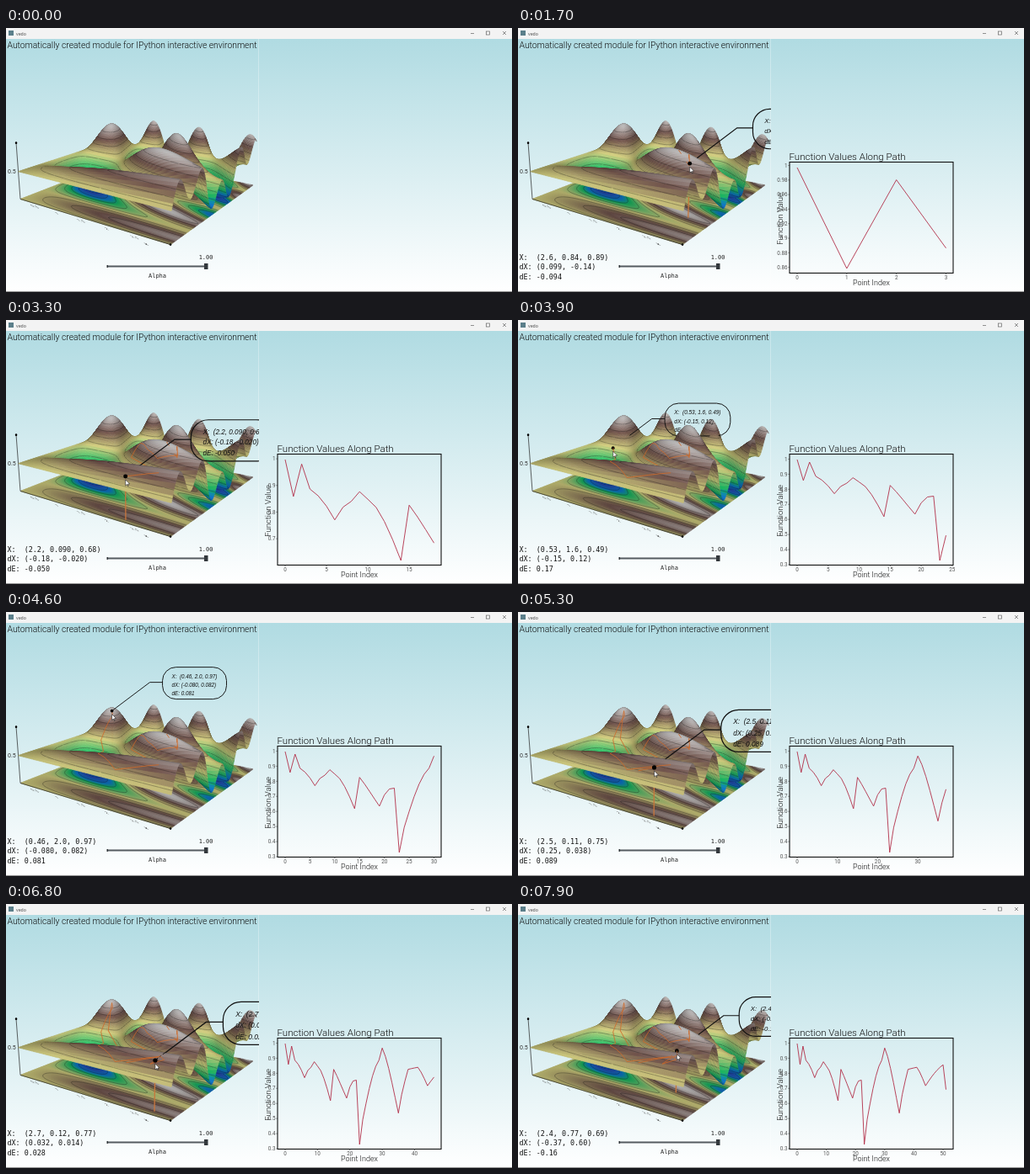
Animation, 600 px wide and 314 px high, one loop 8000 ms. Source, as an HTML page with a canvas:

```html
<!DOCTYPE html>
<html lang="en">
<head>
<meta charset="utf-8">
<title>vedo</title>
<style>
html, body { margin: 0; width: 100%; height: 100%; overflow: hidden; background: #fff }
canvas { display: block }
</style>
</head>
<body>
<canvas id="stage" width="600" height="314"></canvas>
<script>
const LOOP = 8000, STEP = 100, FIRST = 14, BANDS = 28, CELLS = 100;
const SANS = 'Roboto, sans-serif', MONO = '"DejaVu Sans Mono", monospace';
const stage = document.getElementById('stage').getContext('2d');
const mix = (a, b, r) => a + (b - a) * r;

// Surface and camera
const height = (x, y) => Math.sin(2 * x * y) * Math.cos(3 * y) / 2 + 0.5;
const yaw = 0.6144, pitch = 0.2984, focal = 561.7;
const cy = Math.cos(yaw), sy = Math.sin(yaw), cp = Math.cos(pitch), sp = Math.sin(pitch);

function project(x, y, z) {
  const a = x - 1.5, b = y - 1.5;
  const right = a * cy + b * sy + 0.1603, away = b * cy - a * sy;
  const depth = 8.497 + away * cp - z * sp;
  return {
    x: 150 + focal * right / depth,
    y: 163.5 - focal * (away * sp + z * cp - 0.474) / depth,
    depth, away,
    band: Math.max(0, Math.min(BANDS - 1, Math.floor((2.1 - away) / 4.2 * BANDS)))
  };
}

// Value between the keys [position, ...values] that surround t
function between(keys, t) {
  let i = 0;
  while (i < keys.length - 2 && t > keys[i + 1][0]) i++;
  const [p, q] = [keys[i], keys[i + 1]], r = (t - p[0]) / (q[0] - p[0]);
  return p.slice(1).map((v, j) => mix(v, q[j + 1], r));
}

// Turning points of the walk: visit number, x, y
const turns = [
  [0, 2.27, 1.06], [1, 2.6, .825], [2, 2.501, .984], [3, 2.6, .8425], [6, 2.23, .86], [8, 1.95, 1],
  [10, 1.669, 1.219], [11, 1.651, 1.183], [14, 1.58, 1.07], [15, 2.7, .15], [19, 2, .07],
  [22, 1.55, .24], [23, .684, 1.443], [24, .53, 1.567], [29, .535, 1.928], [30, .4555, 2.01],
  [35, .68, 1.6], [36, 2.2, .075], [38, 2.7, .15], [41, 2.706, .162], [42, 2.8, .13],
  [44, 2.6, .09], [50, 2.79, .172], [51, 2.42, .773]
];
const path = Array.from({ length: 52 }, (_, i) => {
  const [x, y] = between(turns, i);
  return [x, y, height(x, y)];
});

// A steady pace, about half as fast near the end
function visited(step) {
  if (step < FIRST) return -1;
  return Math.round(0.94 * Math.min(step - FIRST, 45) + 0.45 * Math.max(0, step - FIRST - 45));
}

// Terrain colours: height, r, g, b
const stops = [[0, 50, 75, 200], [.15, 15, 145, 240], [.25, 30, 215, 115],
  [.5, 248, 243, 150], [.75, 132, 98, 90], [1, 250, 250, 250]];
const colour = (z, light) => `rgb(${between(stops, z).map(c => Math.round(c * light))})`;

function light(x, y) {
  const e = 0.001;
  const gx = (height(x + e, y) - height(x - e, y)) / (2 * e);
  const gy = (height(x, y + e) - height(x, y - e)) / (2 * e);
  const facing = (-gx * sy * cp + gy * cy * cp + sp) / Math.hypot(gx, gy, 1);
  return 0.55 + 0.38 * Math.abs(facing);
}

function canvas(width) {
  const c = document.createElement('canvas');
  c.width = width;
  c.height = 314;
  return c.getContext('2d');
}
function line(g, points, style, width) {
  g.beginPath();
  points.forEach(p => g.lineTo(p.x, p.y));
  g.strokeStyle = style;
  g.lineWidth = width;
  g.stroke();
}
function text(g, s, x, y, font, style = '#111', align = 'left') {
  g.font = font;
  g.fillStyle = style;
  g.textAlign = align;
  g.fillText(s, x, y);
}
function dot(g, x, y, r) {
  g.fillStyle = '#000';
  g.beginPath();
  g.arc(x, y, r, 0, 7);
  g.fill();
}

// Fills each cell on its layer, far to near, then puts the level lines on top
function mesh(layerOf, flat) {
  const d = 3 / CELLS, lines = [], cells = [];
  for (let i = 0; i < CELLS; i++) for (let j = 0; j < CELLS; j++) {
    const x = i * d, y = j * d;
    cells.push({ x, y, mid: project(x + d / 2, y + d / 2, 0) });
  }
  cells.sort((p, q) => q.mid.away - p.mid.away);
  for (const { x, y, mid } of cells) {
    const corners = [[x, y], [x + d, y], [x + d, y + d], [x, y + d]].map(([a, b]) => {
      const z = height(a, b);
      return { z, ...project(a, b, flat ? 0 : z) };
    });
    const mx = x + d / 2, my = y + d / 2, g = layerOf(mid.band);
    g.beginPath();
    corners.forEach(p => g.lineTo(p.x, p.y));
    g.closePath();
    g.fillStyle = g.strokeStyle = colour(height(mx, my), flat ? 0.7 : light(mx, my));
    g.lineWidth = 0.7;
    g.fill();
    g.stroke();
    for (let level = 1; level < 9; level++) {
      const hits = [];
      corners.forEach((p, c) => {
        const q = corners[(c + 1) % 4], r = (level / 9 - p.z) / (q.z - p.z);
        if (r >= 0 && r < 1) hits.push({ x: mix(p.x, q.x, r), y: mix(p.y, q.y, r) });
      });
      if (hits.length > 1) lines.push([g, hits.slice(0, 2)]);
    }
  }
  lines.forEach(([g, hits]) => line(g, hits, 'rgba(15,15,15,.6)', 0.5));
}

function drawBack(g) {
  const sky = g.createLinearGradient(0, 13, 0, 314);
  sky.addColorStop(0, '#b0dbe2');
  sky.addColorStop(1, '#fff');
  g.fillStyle = sky;
  g.fillRect(0, 13, 600, 301);
  g.fillStyle = 'rgba(255,255,255,.3)';
  g.fillRect(299, 13, 1, 301);
  g.fillStyle = '#f3f3f3';
  g.fillRect(0, 0, 600, 13);
  g.fillStyle = '#999';
  g.fillRect(0, 313, 600, 1);
  g.fillStyle = '#5b7f8a';
  g.fillRect(3, 3, 6, 6);
  text(g, 'vedo', 12, 8.5, '5.5px ' + SANS, '#555');
  g.strokeStyle = '#666';
  g.lineWidth = 0.7;
  g.strokeRect(569.5, 4, 4, 4);
  line(g, [{ x: 551, y: 6.5 }, { x: 555, y: 6.5 }], '#666', 0.7);
  line(g, [{ x: 589, y: 4 }, { x: 593, y: 8 }], '#666', 0.7);
  line(g, [{ x: 593, y: 4 }, { x: 589, y: 8 }], '#666', 0.7);
}

function drawAxes(g) {
  const top = project(0, 0, 1), origin = project(0, 0, 0), end = project(3, 0, 0);
  line(g, [top, origin, end], '#222', 0.7);
  dot(g, top.x, top.y, 1.3);
  dot(g, end.x, end.y, 1.3);
  text(g, '0.5', 2, 173, '7px ' + SANS, '#333');
  const label = (s, x, y, font) => {
    const p = project(x, y, 0), q = project(x + 0.1, y, 0);
    g.save();
    g.translate(p.x, p.y);
    g.transform(1, (q.y - p.y) / (q.x - p.x), 0.6, 0.6, 0, 0);
    text(g, s, 0, 0, font, '#555', 'center');
    g.restore();
  };
  for (let x = 0.5; x < 3; x += 0.5) label(String(x), x, -0.12, '6.5px ' + SANS);
  label('x', 2.75, -0.2, 'bold 8px ' + SANS);
}

const bands = Array.from({ length: BANDS }, () => canvas(300)), back = canvas(600);
drawBack(back);
mesh(() => back, true);
drawAxes(back);
mesh(b => bands[b], false);

const short = v => v.toPrecision(2);
function readout(i) {
  const p = path[i], q = path[Math.max(0, i - 1)];
  const [dx, dy, de] = p.map((v, j) => v - q[j]);
  return [
    `X:  (${p.map(short).join(', ')})`,
    `dX: (${short(dx)}, ${short(dy)})`,
    `dE: ${short(de)}`
  ];
}

function drawCallout(g, ball, rows) {
  g.save();
  g.translate(ball.x, ball.y);
  const s = mix(1, 9.18 / ball.depth, 0.85);
  g.scale(s, s);
  line(g, [{ x: 0, y: 0 }, { x: 45, y: -34 }, { x: 60, y: -34 }], '#111', 0.95);
  g.beginPath();
  g.roundRect(60, -52, 76, 38, 16);
  g.stroke();
  rows.forEach((row, i) => text(g, row, 71, -39 + i * 10, 'italic 6.3px "Liberation Sans", sans-serif'));
  g.restore();
}

function drawCursor(g, x, y) {
  g.save();
  g.translate(x, y);
  g.beginPath();
  [[0, 0], [0, 7], [1.7, 5.5], [3.2, 8], [3, 5], [5, 5]].forEach(p => g.lineTo(...p));
  g.closePath();
  g.fillStyle = '#fff';
  g.strokeStyle = '#222';
  g.lineWidth = 0.6;
  g.fill();
  g.stroke();
  g.restore();
}

// Short straight pieces between visits, without those under the surface
function trail(last) {
  const pieces = [], PARTS = 8;
  for (let i = 1; i <= last; i++) for (let k = 0; k < PARTS; k++) {
    const at = r => path[i].map((v, j) => mix(path[i - 1][j], v, r));
    const [x, y, z] = at((k + 0.5) / PARTS);
    if (z > height(x, y) - 0.03)
      pieces.push([project(...at(k / PARTS)), project(...at((k + 1) / PARTS))]);
  }
  return pieces;
}

function drawSurface(g, last) {
  const ball = last < 0 ? null : project(...path[last]);
  const pieces = trail(last), after = p => Math.min(BANDS - 1, p.band + 1);
  bands.forEach((b, j) => {
    if (ball && ball.band === j) {
      const [x, y] = path[last];
      line(g, [ball, project(x, y, 0)], '#c8763c', 1.3);
      drawCallout(g, ball, readout(last));
    }
    g.drawImage(b.canvas, 0, 0);
    for (const p of pieces) if (after(p[0]) === j) line(g, p, '#cf6a2a', 0.9);
    if (ball && after(ball) === j) dot(g, ball.x, ball.y, 17 / ball.depth);
  });
  return ball;
}

function drawPanel(g, last) {
  text(g, 'Automatically created module for IPython interactive environment', 1.5, 24, '300 10.35px ' + SANS);
  if (last >= 0) readout(last).forEach((row, i) => text(g, row, 1.5, 276 + i * 11.4, '8.4px ' + MONO));
  line(g, [{ x: 120, y: 283.5 }, { x: 238, y: 283.5 }], '#555b60', 2);
  g.fillStyle = '#33383c';
  g.fillRect(119.5, 282, 1.5, 3);
  g.fillRect(235, 280, 4.5, 7);
  text(g, '1.00', 237, 274.5, '6.9px ' + MONO, '#222', 'center');
  text(g, 'Alpha', 179.5, 296.5, '7px ' + MONO, '#222', 'center');
}

function niceStep(range) {
  for (let e = 0.001; ; e *= 10) for (const m of [1, 2, 5])
    if (range / (m * e) <= 7) return m * e;
}

function drawChart(g, last) {
  const values = path.slice(0, last + 1).map(p => p[2]);
  const low = Math.min(...values), high = Math.max(...values);
  const px = i => 331 + 176.5 * i / last;
  const py = v => 286 - 120 * (v - low) / (high - low);
  line(g, values.map((v, i) => ({ x: px(i), y: py(v) })), '#b3304a', 0.9);
  g.strokeStyle = '#111';
  g.lineWidth = 1.1;
  g.strokeRect(322, 159.5, 194, 132);
  text(g, 'Function Values Along Path', 321.5, 156.5, '300 11.5px ' + SANS);
  text(g, 'Point Index', 419, 306, '300 9px ' + SANS, '#111', 'center');
  g.save();
  g.translate(314, 227);
  g.rotate(-Math.PI / 2);
  text(g, 'Function Value', 0, 0, '300 9.5px ' + SANS, '#111', 'center');
  g.restore();
  const xs = Math.max(1, niceStep(last)), ys = niceStep(high - low);
  for (let i = 0; px(i) < 516; i += xs) {
    line(g, [{ x: px(i), y: 291 }, { x: px(i), y: 293 }], '#333', 0.7);
    text(g, String(Math.round(i)), px(i), 299, '6.3px ' + SANS, '#555', 'center');
  }
  for (let n = Math.ceil(low / ys - 1); n * ys < 1.2; n++) {
    const y = py(n * ys);
    if (y < 159.5 || y > 291.5) continue;
    line(g, [{ x: 320.5, y }, { x: 322, y }], '#333', 0.7);
    text(g, String(+(n * ys).toFixed(3)), 319.5, y + 2.2, '6.3px ' + SANS, '#555', 'right');
  }
}

function draw(step) {
  const g = stage, last = visited(step);
  g.drawImage(back.canvas, 0, 0);
  g.save();
  g.beginPath();
  g.rect(0, 13, 300, 301);
  g.clip();
  const ball = drawSurface(g, last);
  drawPanel(g, last);
  // The cursor comes in from the right, then stays just below the ball
  const goal = ball || project(...path[0]), r = Math.min(1, step / FIRST);
  if (step > 0) drawCursor(g, mix(300, goal.x, r), mix(150, goal.y + 4, r));
  g.restore();
  if (last > 0) drawChart(g, last);
}

let shown = -1;
const start = performance.now();
function tick() {
  const step = Math.floor((performance.now() - start) % LOOP / STEP);
  if (step !== shown) draw(shown = step);
  requestAnimationFrame(tick);
}
tick();
</script>
</body>
</html>
```
